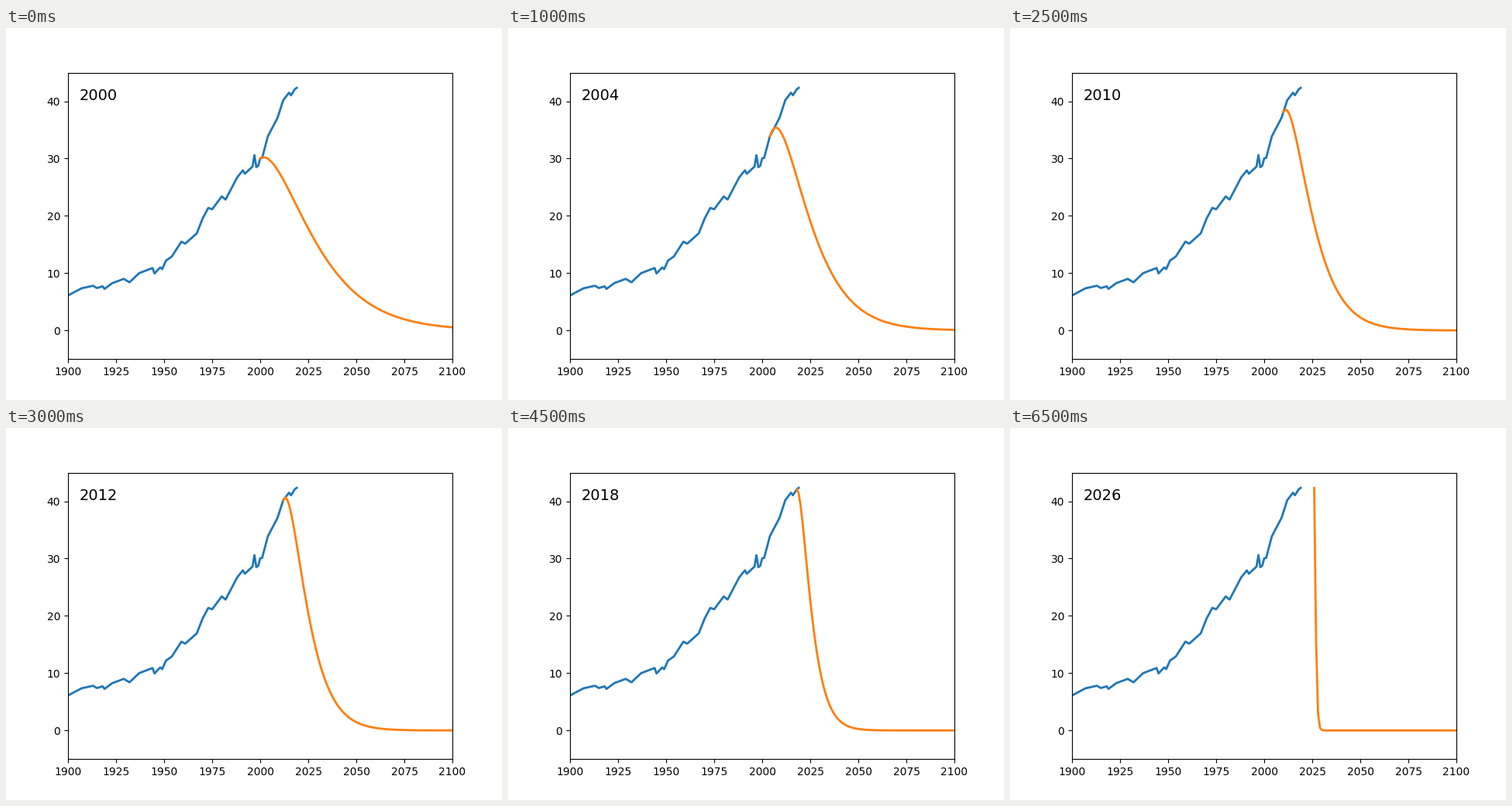
A matplotlib script for the animation above (6.75 s loop, 640 by 480 pixels).

```python
import numpy as np
import matplotlib.pyplot as plt
from matplotlib.animation import FuncAnimation

START, END = 1900, 2100
FIRST_CUT, LAST_CUT = 2000, 2026
FINAL_BUDGET = 39.2   # what may still be emitted after LAST_CUT
TREND_YEARS = 6       # span used to estimate the growth rate before the cut

# Turning points of the yearly emissions, joined by straight lines
TURNS = [
    (1900, 6.1), (1907, 7.35), (1913, 7.8), (1915, 7.4), (1918, 7.7),
    (1919, 7.25), (1923, 8.25), (1929, 9.0), (1932, 8.4), (1937, 10.0),
    (1944, 10.9), (1945, 9.95), (1948, 11.0), (1949, 10.7), (1951, 12.2),
    (1954, 12.9), (1959, 15.5), (1961, 15.15), (1967, 16.95), (1970, 19.5),
    (1973, 21.4), (1975, 21.15), (1980, 23.4), (1982, 22.85), (1988, 26.7),
    (1991, 27.95), (1992, 27.35), (1996, 28.6), (1997, 30.6), (1998, 28.5),
    (1999, 28.75), (2000, 30.05), (2001, 30.1), (2004, 33.9), (2009, 37.1),
    (2012, 40.2), (2015, 41.5), (2016, 41.05), (2018, 42.1), (2019, 42.35),
]

# np.interp holds the last known level until the final cut
years = np.arange(START, LAST_CUT + 1)
emissions = np.interp(years, *zip(*TURNS))
known = years <= TURNS[-1][0]


def mitigation_curve(cut_year):
    """Smooth decline from cut_year whose integral is the remaining budget."""
    i = cut_year - START
    level = emissions[i]
    remaining = FINAL_BUDGET + emissions[i + 1:].sum()
    recent = np.log(emissions[i - TREND_YEARS + 1:i + 1])
    growth = np.polyfit(np.arange(TREND_YEARS), recent, 1)[0]
    span = remaining / level
    decay = (1 + np.sqrt(1 + growth * span)) / span
    t = np.arange(END - cut_year + 1)
    return cut_year + t, level * (1 + (growth + decay) * t) * np.exp(-decay * t)


fig, ax = plt.subplots(figsize=(6.4, 4.8), dpi=100)
ax.set_xlim(START, END)
ax.set_ylim(-5, 45)
ax.plot(years[known], emissions[known], lw=2, color="tab:blue")
curve, = ax.plot([], [], lw=2, color="tab:orange")
label = ax.text(1906, 40.27, "", fontsize=14)


def update(frame):
    cut_year = FIRST_CUT + frame
    curve.set_data(*mitigation_curve(cut_year))
    label.set_text(str(cut_year))
    return curve, label


anim = FuncAnimation(fig, update, frames=LAST_CUT - FIRST_CUT + 1,
                     interval=250, repeat=True, repeat_delay=0)
plt.show()
```
